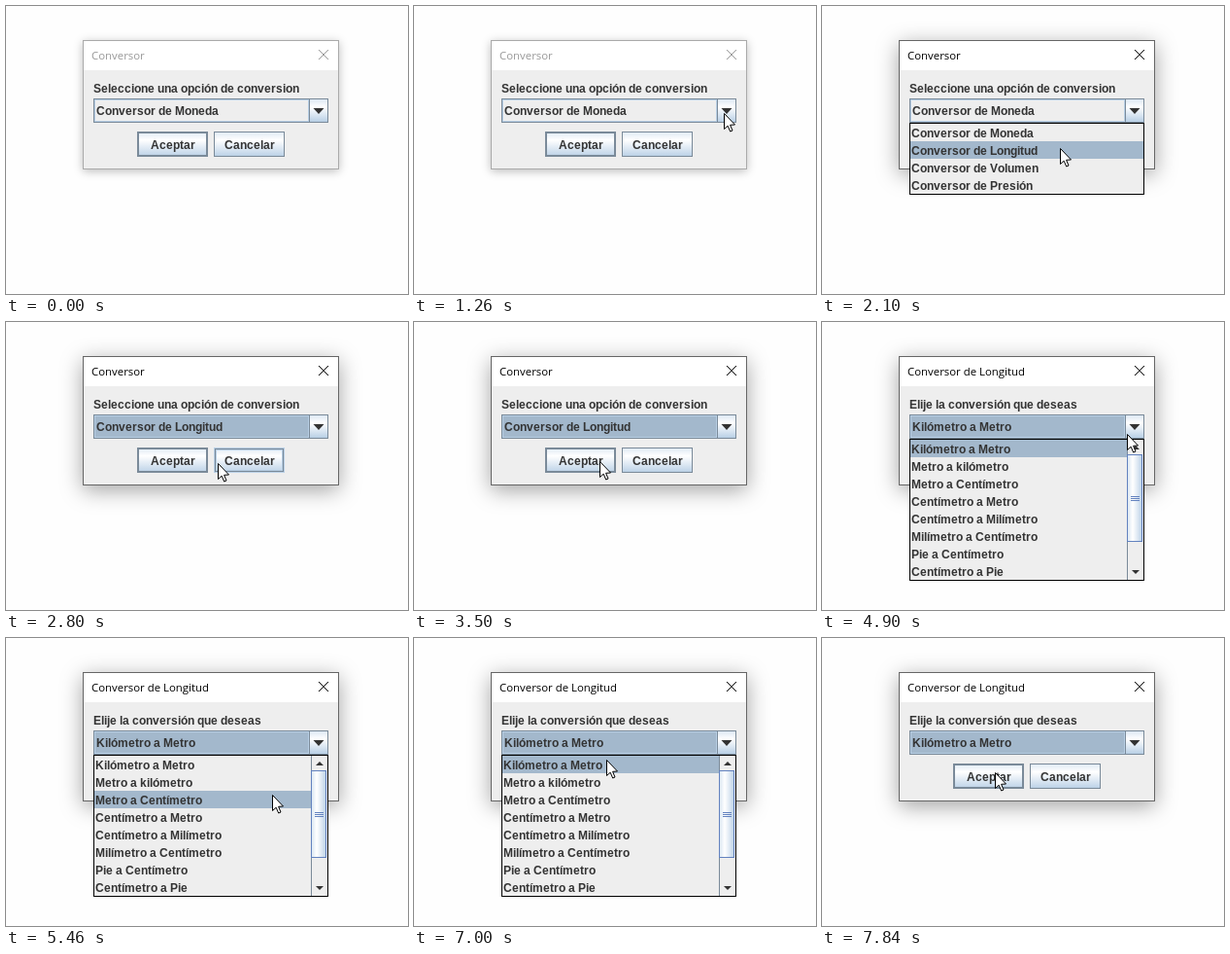
An HTML page with a canvas that plays this animation: 414 by 296 pixels, repeating every 8000 ms.

```html
<!DOCTYPE html>
<html lang="es">
<head>
<meta charset="utf-8">
<style>
  html, body { margin: 0; width: 100%; height: 100%; overflow: hidden; background: #fefefe; }
  canvas { display: block; }
</style>
</head>
<body>
<canvas id="stage" width="414" height="296"></canvas>
<script>
const ctx = document.getElementById('stage').getContext('2d');
const LOOP = 8000, STEP = 140;
const BOLD = 'bold 12px "Liberation Sans", Arial, sans-serif';
const TITLE = '11.4px "Open Sans", sans-serif';
const INK = '#333', EDGE = '#7a8a99', LIGHT = '#b8cfe5', SELECTED = '#a3b8cc', PANEL = '#eee', THUMB = '#6382bf';
const ROW = 18, LIST_TOP = 121;

const KINDS = ['Moneda', 'Longitud', 'Volumen', 'Presión'].map(k => 'Conversor de ' + k);
const LENGTHS = ['Kilómetro a Metro', 'Metro a kilómetro', 'Metro a Centímetro', 'Centímetro a Metro',
  'Centímetro a Milímetro', 'Milímetro a Centímetro', 'Pie a Centímetro', 'Centímetro a Pie'];

// When things happen, in ms
const ACTIVATE = 1400, OPEN_KINDS = 1540, PICK_KIND = 2520, ACCEPT = 3640,
  NEXT_DIALOG = 4060, OPEN_LENGTHS = 4760, PICK_LENGTH = 7420;

const MOVES = [
  { from: 140, to: 1260, x: 320, y: 110 },
  { from: 1400, to: 2100, x: 246, y: 146 },
  { from: 2100, to: 3500, x: 192, y: 143 },
  { from: 3780, to: 4200, x: 266, y: 139 },
  { from: 4200, to: 4620, x: 320, y: 110 },
  { from: 4760, to: 5460, x: 275, y: 161 },
  { from: 6440, to: 7000, x: 199, y: 125 },
  { from: 7280, to: 7840, x: 179, y: 138 }
];

const clamp = (v, low = 0, high = 1) => Math.max(low, Math.min(high, v));
const smooth = k => k * k * (3 - 2 * k);

function pointerAt(t) {
  let x = 336, y = 297;
  for (const move of MOVES) {
    const k = smooth(clamp((t - move.from) / (move.to - move.from)));
    x += (move.x - x) * k;
    y += (move.y - y) * k;
  }
  return { x: Math.round(x), y: Math.round(y) };
}

function opacityAt(t) {
  if (t < NEXT_DIALOG) return 1 - clamp((t - ACCEPT) / 280);
  return 1 - (1 - clamp((t - NEXT_DIALOG) / 280)) ** 2;
}

function fill(x, y, w, h, color) {
  ctx.fillStyle = color;
  ctx.fillRect(x, y, w, h);
}

function frame(x, y, w, h, color) {
  ctx.strokeStyle = color;
  ctx.lineWidth = 1;
  ctx.strokeRect(x + .5, y + .5, w - 1, h - 1);
}

// Swing labels advance by whole pixels per character
const advance = char => Math.round(ctx.measureText(char).width);

function label(str, x, y, centered) {
  ctx.font = BOLD;
  ctx.fillStyle = INK;
  if (centered) x -= Math.floor([...str].reduce((sum, char) => sum + advance(char), 0) / 2);
  for (const char of str) {
    ctx.fillText(char, x, y);
    x += advance(char);
  }
}

function glossy(x, y, w, h, sideways) {
  const g = sideways ? ctx.createLinearGradient(x, 0, x + w, 0) : ctx.createLinearGradient(0, y, 0, y + h);
  ['#dde8f3', '#fff', '#dde8f3', LIGHT].forEach((color, i) => g.addColorStop(i / 3, color));
  fill(x, y, w, h, g);
}

function triangle(x, y, half, height) {
  ctx.fillStyle = INK;
  ctx.beginPath();
  ctx.moveTo(x - half, y);
  ctx.lineTo(x + half, y);
  ctx.lineTo(x, y + height);
  ctx.fill();
}

function button(name, x, borders, pressed) {
  glossy(x, 129, 73, 26);
  if (pressed) fill(x, 129, 73, 26, LIGHT);
  borders.forEach((color, i) => frame(x + i, 129 + i, 73 - 2 * i, 26 - 2 * i, color));
  label(name, x + 37, 147, true);
}

function windowFrame(title, active) {
  ctx.save();
  ctx.shadowColor = active ? 'rgba(0,0,0,.36)' : 'rgba(0,0,0,.26)';
  ctx.shadowBlur = active ? 21 : 9;
  ctx.shadowOffsetY = active ? 5 : 2;
  fill(79, 35, 264, 133, '#fff');
  ctx.restore();
  fill(80, 66, 262, 101, PANEL);
  frame(79, 35, 264, 133, active ? '#666' : '#aaa');
  ctx.font = TITLE;
  ctx.fillStyle = ctx.strokeStyle = active ? '#000' : '#999';
  ctx.fillText(title, 88, 55);
  ctx.beginPath();
  ctx.moveTo(322, 45); ctx.lineTo(332, 55);
  ctx.moveTo(332, 45); ctx.lineTo(322, 55);
  ctx.stroke();
}

function combo(value, focused) {
  fill(90, 95, 242, 25, focused ? SELECTED : PANEL);
  frame(91, 96, 221, 23, LIGHT);
  glossy(312, 96, 19, 23);
  frame(90, 95, 242, 25, EDGE);
  fill(312, 96, 1, 23, EDGE);
  label(value, 93, 112);
  triangle(322, 105, 5.5, 6);
}

function scrollbar() {
  fill(314, LIST_TOP, 17, 144, PANEL);
  fill(314, LIST_TOP, 1, 144, EDGE);
  glossy(315, 137, 15, 88, true);
  frame(314, 136, 16, 90, THUMB);
  for (let y = 179; y < 185; y += 2) fill(318, y, 9, 1, THUMB);
  triangle(323, 131, 4, -4);
  triangle(323, 255, 4, 4);
}

function popup(items, pointer) {
  const height = items.length * ROW;
  const hovered = clamp(Math.floor((pointer.y - LIST_TOP) / ROW), 0, items.length - 1);
  fill(90, LIST_TOP - 1, 242, height + 2, PANEL);
  fill(91, LIST_TOP + hovered * ROW, 240, ROW, SELECTED);
  items.forEach((item, i) => label(item, 92, LIST_TOP + 14 + i * ROW));
  if (items.length > 4) scrollbar();
  frame(90, LIST_TOP - 1, 242, height + 2, '#000');
}

function drawPointer({ x, y }) {
  ctx.beginPath();
  [[0, 0], [0, 16], [3.7, 12.7], [6.2, 18.5], [8.5, 17.5], [6.1, 11.8], [11, 11.5]]
    .forEach(([dx, dy]) => ctx.lineTo(x + dx - .5, y + dy + .5));
  ctx.closePath();
  ctx.fillStyle = '#fff';
  ctx.fill();
  ctx.strokeStyle = '#000';
  ctx.lineWidth = 1;
  ctx.stroke();
}

function dialog(t, pointer) {
  const second = t >= NEXT_DIALOG, chosen = t >= PICK_KIND;
  const overCancel = pointer.x >= 214 && pointer.x < 287 && pointer.y >= 129 && pointer.y < 155;
  windowFrame(second ? KINDS[1] : 'Conversor', t >= ACTIVATE);
  label(second ? 'Elije la conversión que deseas' : 'Seleccione una opción de conversion', 90, 89);
  combo(second ? LENGTHS[0] : KINDS[chosen ? 1 : 0], chosen);
  button('Aceptar', 135, [EDGE, EDGE], t >= ACCEPT && t < ACCEPT + STEP);
  button('Cancelar', 214, overCancel ? [LIGHT, EDGE, LIGHT] : [EDGE]);
  if (t >= OPEN_KINDS && t < PICK_KIND) popup(KINDS, pointer);
  if (t >= OPEN_LENGTHS && t < PICK_LENGTH) popup(LENGTHS, pointer);
}

function draw(t) {
  const pointer = pointerAt(t), veil = 1 - opacityAt(t);
  ctx.save();
  fill(0, 0, 414, 296, '#fefefe');
  ctx.translate(211, 101);
  ctx.scale(1 - veil * .055, 1 - veil * .055);
  ctx.translate(-211, -101);
  dialog(t, pointer);
  ctx.restore();
  fill(0, 0, 414, 296, `rgba(254,254,254,${veil})`);
  drawPointer(pointer);
}

const start = performance.now();
function tick() {
  const t = (performance.now() - start) % LOOP;
  draw(Math.floor(t / STEP) * STEP);
  requestAnimationFrame(tick);
}
tick();
</script>
</body>
</html>
```
